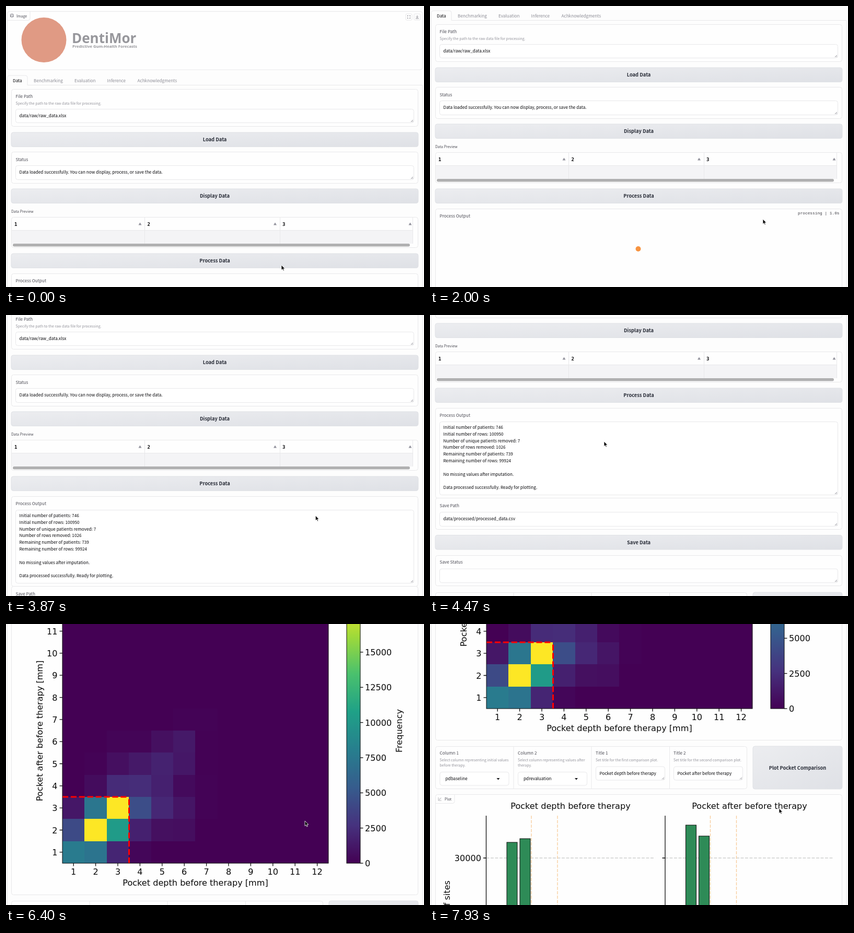
Recreate the animation shown at these times as an HTML page. Size 800 px wide and 538 px high, loop 8 s.

```html
<!DOCTYPE html>
<html lang="en">
<head>
<meta charset="utf-8">
<title>Data processing walkthrough</title>
<style>
  html, body { margin: 0; width: 100%; height: 100%; overflow: hidden; background: #fdfdfd; }
  svg { display: block; width: 100%; height: 100%; }
  text { font-family: "Noto Sans CJK SC", "Noto Sans CJK JP", "Noto Sans CJK", "Noto Sans", sans-serif; font-size: 8.2px; fill: #09090c; }
  .label { fill: #4b4b54; }
  .info { font-size: 7px; fill: #94949c; }
  .small { font-size: 7px; fill: #4b4b54; }
  .tab { fill: #8c8c95; }
  .button { font-size: 9.3px; font-weight: 600; text-anchor: middle; fill: #262a35; }
  .mono { font-family: "Liberation Mono", monospace; font-size: 7.8px; fill: #3f3f46; text-anchor: end; }
  .head { font-family: "DejaVu Sans Mono", monospace; font-size: 9px; font-weight: 700; }
  .brand { font-family: "Open Sans", "Noto Sans", sans-serif; font-size: 26px; font-weight: 700; fill: #97979c; }
  .tagline { font-family: "Open Sans", "Noto Sans", sans-serif; font-size: 7.6px; font-weight: 700; fill: #97979c; }
  .plot { font-family: "DejaVu Sans", sans-serif; font-size: 16.1px; fill: #0a0a0a; }
  .mid { text-anchor: middle; }
  .end { text-anchor: end; }
</style>
</head>
<body>
<svg viewBox="0 0 800 538" preserveAspectRatio="none">
  <defs>
    <linearGradient id="btn" x2="1" y2="1">
      <stop stop-color="#ecedf0"/><stop offset="1" stop-color="#dfe1e6"/>
    </linearGradient>
    <linearGradient id="bar" x1="0" y1="1" x2="0" y2="0"></linearGradient>
  </defs>
  <g id="page"></g>
  <path id="cursor" d="M0 0V9.6L2.2 7.6 3.7 11 5.3 10.3 3.8 7H6.8Z" fill="#050505" stroke="#fff" stroke-width=".8"/>
</svg>
<script>
const LOOP = 8000;
const CLICK = 1490, PROCESSED = 3750, HISTOGRAM = 5850, COMPARISON = 7600;
const BORDER = '#e8e8ea', ICON = '#70707a', INK = '#0a0a0a';
const $ = id => document.getElementById(id);

// ---- markup helpers ----
const text = (s, x, y, cls = '', extra = '') => `<text x="${x}" y="${y}" class="${cls}" ${extra}>${s}</text>`;
const rect = (x1, y1, x2, y2, fill, stroke = 'none', r = 0) =>
  `<rect x="${x1}" y="${y1}" width="${x2 - x1}" height="${y2 - y1}" rx="${r}" fill="${fill}" stroke="${stroke}"/>`;
const path = (d, stroke, width = 1, extra = '') => `<path d="${d}" fill="none" stroke="${stroke}" stroke-width="${width}" ${extra}/>`;
const group = (id, body, y = 0) => `<g id="${id}" transform="translate(0 ${y})">${body}</g>`;
const range = (n, f) => Array.from({ length: n }, (_, i) => f(i)).join('');

const block = (y1, y2, x1 = 10, x2 = 789) => rect(x1 + .5, y1 + .5, x2 - .5, y2 - .5, '#fefefe', BORDER, 4);
const button = (s, y1, y2 = y1 + 27.5, x1 = 10) =>
  rect(x1, y1, 789, y2, 'url(#btn)', '#dfe1e5', 4) + text(s, (x1 + 789) / 2, (y1 + y2) / 2 + 3.5, 'button');
const field = (y1, y2, lines = [], x1 = 18, x2 = 780, firstLine = 16) =>
  rect(x1 + .5, y1 + .5, x2 + .5, y2 + .5, '#fff', BORDER, 4) +
  path(`M${x2 - 5} ${y2 - 1}l4 -4M${x2 - 2.5} ${y2 - 1}l1.5 -1.5`, ICON, .8) +
  lines.map((s, i) => text(s, x1 + 7.5, y1 + firstLine + i * 12.83)).join('');
const select = (s, x, y) =>
  rect(x + .5, y + .5, x + 132.5, y + 26, '#fff', BORDER, 4) + text(s, x + 11, y + 16) +
  `<path d="M${x + 109} ${y + 12}h6l-3 3.4z" fill="#18181b"/>`;
const chartIcon = (x, y, size) =>
  `<g transform="translate(${x} ${y}) scale(${size / 12})">` +
  path('M0 0V12H12M2 10L11 1M3 4h1M6 2.500h1M7 8h1M10 6h1M4 7h1', ICON, 1) + '</g>';
const corner = (x, y, w, icon, s) =>
  path(`M${x} ${y + 17.5}h${w - 4}q4 0 4 -4v-13`, BORDER) + icon + text(s, x + 18, y + 11.5, 'small');
const plotLabel = y => corner(10, y, 37, chartIcon(16, y + 6, 6), 'Plot');

// Four-column settings row with its button, relative to the row's top.
const settings = (height, columns, buttonText) => {
  const xs = [10, 159.5, 308.5, 458];
  return block(0, height, 10, 607) + xs.slice(1).map(x => path(`M${x + .5} 0V${height}`, BORDER)).join('') +
    columns.map(([name, info, control], i) => {
      const x = [18.5, 168, 317, 466][i];
      return text(name, x, 15.5, 'label') +
        info.map((s, k) => text(s, x, 28.5 + k * 10.7, 'info')).join('') + control(x);
    }).join('') + button(buttonText, 0, height, 618);
};

// ---- viridis colour map ----
const MAX = 18850;
const VIRIDIS = [[68, 1, 84], [70, 50, 126], [54, 92, 141], [39, 127, 142], [31, 161, 135], [74, 193, 109], [160, 218, 57], [253, 231, 37]];
const ramp = v => {
  const p = v / MAX * 7, i = Math.min(6, Math.floor(p));
  return `rgb(${VIRIDIS[i].map((c, k) => Math.round(c + (VIRIDIS[i + 1][k] - c) * (p - i)))})`;
};
$('bar').innerHTML = VIRIDIS.map((c, i) => `<stop offset="${i / 7}" stop-color="rgb(${c})"/>`).join('');

const COUNTS = [
  [7800, 7200, 2000, 300], [4200, MAX, 10300, 1700, 800, 700], [1200, 7400, MAX, 4400, 2100, 1100, 120],
  [0, 600, 2300, 2400, 1700, 500, 100], [0, 100, 750, 1300, 1800, 1200, 80], [0, 0, 200, 200, 800, 1300, 80],
  [0, 0, 0, 0, 0, 100, 100]];

function heatmap() {
  const W = 42.4, H = 42.33, left = 108, bottom = 458, top = bottom - 12 * H;
  const cells = COUNTS.map((row, r) => row.map((v, c) => v &&
    `<rect x="${left + c * W}" y="${bottom - (r + 1) * H}" width="${W}" height="${H}" fill="${ramp(v)}" shape-rendering="crispEdges"/>`)
    .filter(Boolean).join('')).join('');
  const axes = range(12, i => {
    const x = left + (i + .5) * W, y = bottom - (i + .5) * H;
    return path(`M${x} ${bottom}v5.500M${left} ${y}h-5.500`, INK, 1.3) +
      text(i + 1, x, 480, 'plot mid') + text(i + 1, 98.5, y + 6, 'plot end');
  });
  const scale = range(8, i => {
    const y = bottom - i * 67.35;
    return path(`M678 ${y}h5.500`, INK, 1.3) + text(i * 2500, 687, y + 6, 'plot');
  });
  const turned = (s, x) => text(s, 0, 0, 'plot mid', `transform="translate(${x} 204.500) rotate(-90)"`);
  const edge = 'stroke-dasharray="11.1 4.800"';
  return rect(left, top, 617, bottom, ramp(0)) + cells +
    path(`M${left} ${bottom - 3 * H}H235.500`, '#f00', 3, edge) + path(`M235.500 ${bottom}V${bottom - 3 * H}`, '#f00', 3, edge) +
    rect(left, top, 617, bottom, 'none', INK) + rect(652, top, 678, bottom, 'url(#bar)', INK) + axes + scale +
    text('Pocket depth before therapy [mm]', 362.5, 501, 'plot mid') +
    turned('Pocket after before therapy [mm]', 70) + turned('Frequency', 758);
}

// Bar charts, relative to the top of the comparison row.
function comparison() {
  const chart = (x, title, tops) =>
    text(title, x + 161.5, 120, 'plot mid') +
    path(`M${x} 214H${x + 323}`, '#b8bab8', 1.1, 'stroke-dasharray="5.900 2.600"') +
    tops.map((y, i) => rect(x + 39.5 + i * 25, y, x + 59.5 + i * 25, 520, '#2e8b57', INK)).join('') +
    [86.5, 136.5].map(d => path(`M${x + d} 133V520`, '#f7cb98', 1.3, 'stroke-dasharray="5.900 2.600"')).join('') +
    path(`M${x} 133V520M${x} 214h-5.500`, INK, 1.3);
  return block(92, 560) + plotLabel(92) +
    chart(107.5, 'Pocket depth before therapy', [184, 177]) + chart(450, 'Pocket after before therapy', [151, 172]) +
    text(30000, 98, 220, 'plot end') +
    text('Number of sites', 0, 0, 'plot mid', 'transform="translate(38 321) rotate(-90)"');
}

// ---- page ----
const emptyPlot = (y, height = 156) => block(y, y + height) + plotLabel(y) + chartIcon(394, y + 72, 11);

const header =
  rect(2.5, 10.5, 797, 122, '#fefefe', BORDER, 4) +
  corner(2, 10, 44, rect(8.5, 15.5, 14, 21, 'none', ICON, 1) + path('M9 20l2 -2.500 3 3', ICON, .8), 'Image') +
  `<circle cx="72.500" cy="65" r="43" fill="#e09a84"/>` +
  text('DentiMor', 126, 70.5, 'brand') + text('Predictive Gum-Health Forecasts', 127, 80, 'tagline') +
  rect(765, 15, 777, 27, 'none', BORDER, 2) + rect(781, 15, 793, 27, 'none', BORDER, 2) +
  path('M768.500 20v-1.500h1.500M772 18.500h1.500v1.500M773.500 22v1.500h-1.500M770 23.500h-1.500v-1.500M787 18v4M785 20.500l2 2 2 -2M784 24h6', ICON, .8) +
  path('M2.500 2200V137q0 -4 4 -4H37q4 0 4 4V151.500H797V2200', BORDER) +
  text('Data', 13, 146, '', 'font-weight="500"') +
  [['Benchmarking', 53], ['Evaluation', 131], ['Inference', 193.5], ['Achknowledgments', 251.5]]
    .map(([s, x]) => text(s, x, 146, 'tab')).join('');

const loading =
  block(159, 231) + text('File Path', 18.5, 175.5, 'label') +
  text('Specify the path to the raw data file for processing.', 18.5, 188.5, 'info') +
  field(197, 223, ['data/raw/raw_data.xlsx']) + button('Load Data', 242) +
  block(279, 340) + text('Status', 18.5, 296.5, 'label') +
  field(305, 332, ['Data loaded successfully. You can now display, process, or save the data.']) +
  button('Display Data', 350) + text('Data Preview', 10, 396, 'small') +
  block(404, 463) + rect(11, 429, 778, 455, '#f4f4f6') +
  path('M265.500 404V455M524.500 404V455M778.500 404V455M11 429.500H778', BORDER) +
  [16, 270.5, 529].map((x, i) => text(i + 1, x, 420.5, 'head')).join('') +
  [256.5, 515, 773.5].map(x => `<path d="M${x - 3} 419.500h6l-3 -5z" fill="#92929c"/>`).join('') +
  rect(13, 455, 773, 460.5, '#b0b0b1', 'none', 2.7) + button('Process Data', 474);

const outputLabel = text('Process Output', 18.5, 528.5, 'label');
const idle = block(512, 667) + outputLabel + field(538, 661);
const pending = block(512, 667) + outputLabel +
  '<text id="timer" x="783.500" y="523" class="mono"></text><circle cx="398.500" cy="589" r="5" fill="#f79340"/>';
const finished = block(512, 685) + outputLabel + field(538, 678, [
  'Initial number of patients: 746', 'Initial number of rows: 100950', 'Number of unique patients removed: 7',
  'Number of rows removed: 1026', 'Remaining number of patients: 739', 'Remaining number of rows: 99924', '',
  'No missing values after imputation.', '', 'Data processed successfully. Ready for plotting.'], 18, 780, 14);

const saving =
  block(684, 745) + text('Save Path', 18.5, 701.5, 'label') + field(711, 738, ['data/processed/processed_data.csv']) +
  button('Save Data', 755.5) +
  block(794, 853) + text('Save Status', 18.5, 810, 'label') + field(819.5, 846);

const before = ['Select column representing initial values', 'before therapy.'];
const after = ['Select column representing values after', 'therapy.'];
const pick = (s, y) => x => select(s, x, y);
const area = (lines, y1, y2) => x => field(y1, y2, lines, x, x + 132);

const histogramRow = settings(93, [
  ['Column Before', before, pick('pdbaseline', 48)],
  ['Column After', after, pick('pdrevaluation', 48)],
  ['x-Axis Label', ['Enter label for the x-axis of the 2D', 'histogram plot.'], area(['Pocket depth before therapy', '[mm]'], 48, 86)],
  ['y-Axis Label', ['Enter label for the y-axis of the 2D', 'histogram plot.'], area(['Pocket after before therapy', '[mm]'], 48, 86)],
], 'Plot 2D Histogram');
const comparisonRow = settings(82, [
  ['Column 1', before, pick('pdbaseline', 49)],
  ['Column 2', after, pick('pdrevaluation', 49)],
  ['Title 1', ['Set title for the first comparison plot.'], area(['Pocket depth before therapy'], 38.5, 64.5)],
  ['Title 2', ['Set title for the second comparison plot.'], area(['Pocket after before therapy'], 38.5, 64.5)],
], 'Plot Pocket Comparison');

$('page').innerHTML = header + loading +
  group('idle', idle) + group('pending', pending) + group('finished', finished) +
  group('rest', saving + group('histogramRow', histogramRow, 865) +
    group('noHistogram', emptyPlot(968)) +
    group('histogram', block(968, 1565) + plotLabel(968) + group('heatmap', heatmap(), 1046)) +
    group('lower', comparisonRow + group('noComparison', emptyPlot(92)) + group('comparison', comparison())));

// ---- motion ----
const SCROLL = [[0, 0], [1600, 0], [1950, 124], [2600, 124], [2900, 158], [3800, 158], [4400, 334], [4550, 334],
  [5150, 631], [5950, 631], [6350, 1046], [6500, 1046], [7000, 1342]];
const POINTER = [[0, 527, 496], [1300, 527, 491], [1550, 527, 491], [2000, 637, 408], [3330, 638, 409.5], [3700, 638, 409],
  [4400, 333, 242], [4600, 333, 242], [5200, 350, 306], [5300, 350, 306], [5650, 700, 282], [5900, 700, 282],
  [6350, 572, 377], [6800, 572, 377], [7300, 690, 276], [7550, 690, 276], [7900, 668, 353]];

function track(keys, t) {
  const i = keys.findIndex(k => k[0] > t);
  if (i < 0) return keys[keys.length - 1].slice(1);
  const [a, b] = [keys[i - 1], keys[i]], p = (t - a[0]) / (b[0] - a[0]), e = p * p * (3 - 2 * p);
  return a.slice(1).map((v, c) => v + (b[c + 1] - v) * e);
}
const show = (id, on) => $(id).setAttribute('display', on ? 'inline' : 'none');
const move = (id, x, y) => $(id).setAttribute('transform', `translate(${x} ${y})`);

function frame() {
  const t = performance.now() % LOOP;
  move('page', 0, -Math.round(track(SCROLL, t)[0]));
  move('cursor', ...track(POINTER, t));
  show('idle', t < CLICK);
  show('pending', t >= CLICK && t < PROCESSED);
  show('finished', t >= PROCESSED);
  $('timer').textContent = `processing | ${(Math.max(0, t - CLICK) * 1.955 / 1000).toFixed(1)}s`;
  move('rest', 0, t < PROCESSED ? -17 : 0);
  show('noHistogram', t < HISTOGRAM);
  show('histogram', t >= HISTOGRAM);
  move('lower', 0, t < HISTOGRAM ? 1134 : 1576);
  show('noComparison', t < COMPARISON);
  show('comparison', t >= COMPARISON);
  requestAnimationFrame(frame);
}
frame();
</script>
</body>
</html>
```
